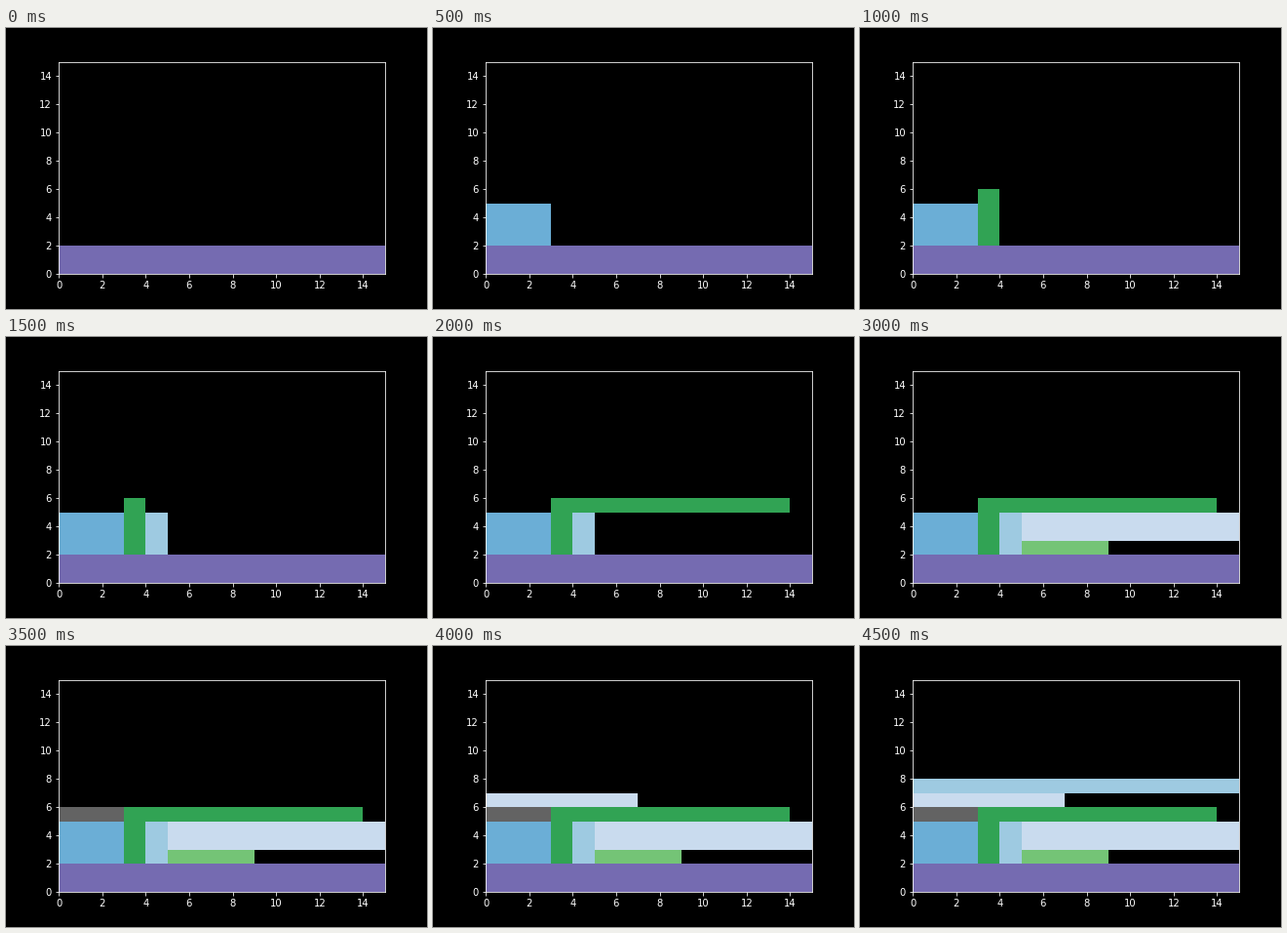
These frames come from a looping animation (432x288 px, 5 s). A matplotlib script:

```python
import matplotlib.pyplot as plt
from matplotlib.animation import FuncAnimation
from matplotlib.patches import Rectangle

STEP_MS = 500
SIZE = 15

PURPLE, BLUE, SKY, PALE = "#756bb1", "#6baed6", "#9ecae1", "#c9dbee"
GREEN, LIME, GRAY = "#31a354", "#74c476", "#636363"

# x, y, width, height, colour, in order of placement
BLOCKS = [
    (0, 0, 15, 2, PURPLE),
    (0, 2, 3, 3, BLUE),
    (3, 2, 1, 4, GREEN),
    (4, 2, 1, 3, SKY),
    (4, 5, 10, 1, GREEN),
    (5, 2, 4, 1, LIME),
    (5, 3, 10, 2, PALE),
    (0, 5, 3, 1, GRAY),
    (0, 6, 7, 1, PALE),
    (0, 7, 15, 1, SKY),
]

plt.style.use("dark_background")
plt.rcParams["font.family"] = "DejaVu Sans"

fig = plt.figure(figsize=(6, 4), dpi=72)
ax = fig.add_axes([0.125, 0.125, 0.775, 0.755])
ax.set_xlim(0, SIZE)
ax.set_ylim(0, SIZE)
ax.set_xticks(range(0, SIZE, 2))
ax.set_yticks(range(0, SIZE, 2))

rects = [
    ax.add_patch(Rectangle((x, y), w, h, facecolor=color, linewidth=0, snap=True))
    for x, y, w, h, color in BLOCKS
]


def update(frame):
    for i, rect in enumerate(rects):
        rect.set_visible(i <= frame)
    return rects


anim = FuncAnimation(
    fig,
    update,
    frames=len(BLOCKS),
    init_func=lambda: update(0),
    interval=STEP_MS,
    repeat=True,
    repeat_delay=0,
    blit=False,
)
plt.show()
```
